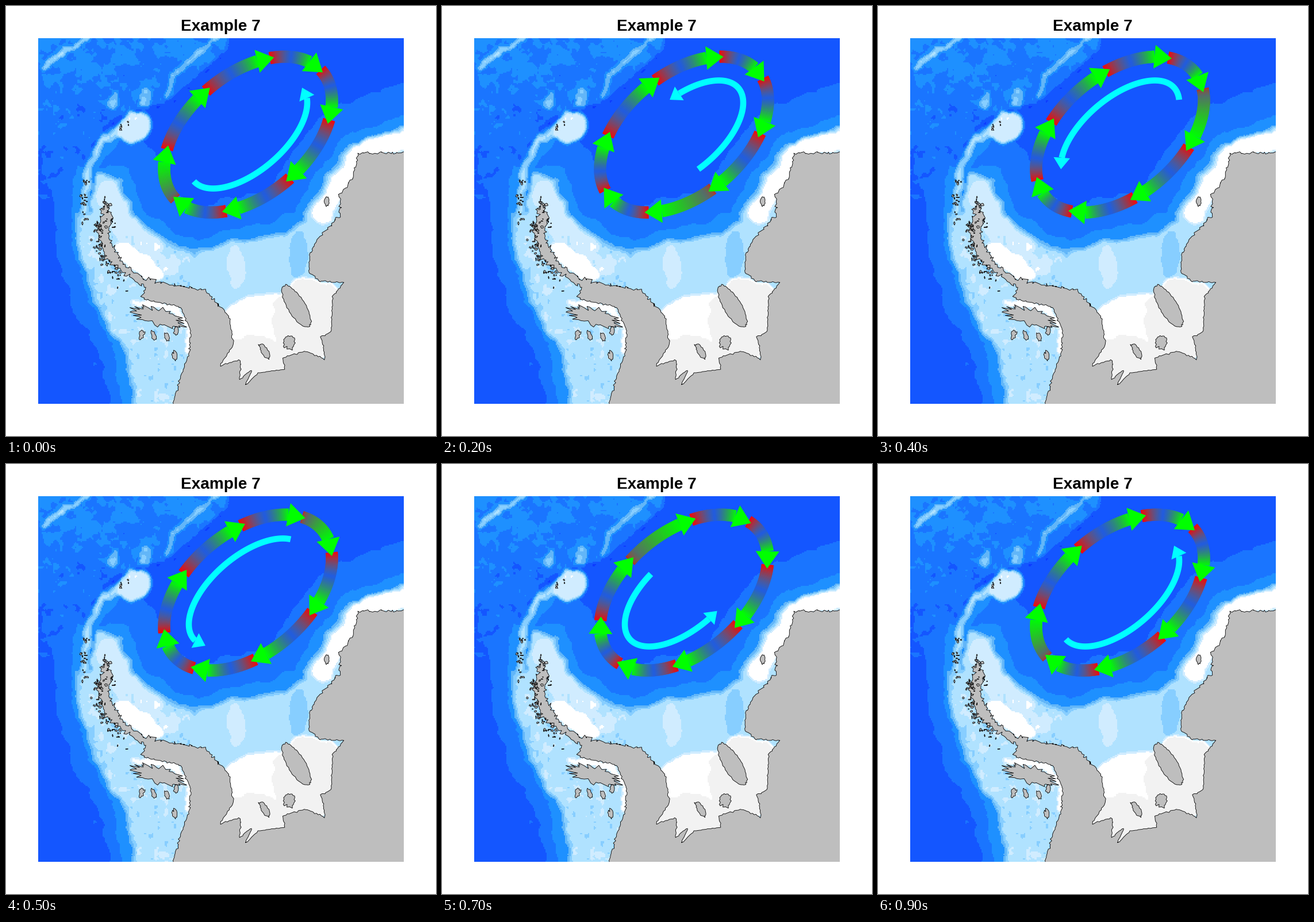
A matplotlib script for the animation above (1000 ms loop, 748 px wide and 748 px high).

```python
import numpy as np
import matplotlib.pyplot as plt
from matplotlib.animation import FuncAnimation
from matplotlib.collections import PolyCollection
from matplotlib.patches import Rectangle
from matplotlib.path import Path

SIZE, LEFT, RIGHT, CELL = 748, 56, 692, 2
FRAMES, TURN = 10, 40          # degrees turned per frame
rng = np.random.default_rng(7)

fig = plt.figure(figsize=(SIZE / 100, SIZE / 100), dpi=100, facecolor="white")
ax = fig.add_axes([0, 0, 1, 1])
ax.axis("off")

# ---- sea floor: a depth field built from distances, then cut into levels ----
SHADES = ["#0d3cff", "#1456ff", "#1a75ff", "#1e90ff", "#62b6f8",
          "#87ceff", "#b0e2ff", "#d0ecff", "#ffffff", "#f2f2f2"]
axis = np.arange(LEFT, RIGHT, CELL) + CELL / 2
N = len(axis)


def noise(scale):
    """Smooth random field of about unit spread with blobs of `scale` pixels."""
    m = int((RIGHT - LEFT) / scale) + 2
    knots = np.linspace(LEFT, RIGHT, m)
    rows = np.array([np.interp(axis, knots, r) for r in rng.normal(size=(m, m))])
    return np.array([np.interp(axis, knots, c) for c in rows.T]).T


gx, gy = np.meshgrid(axis, axis)
wx = gx + 3 * noise(16) + 1.2 * noise(5)
wy = gy + 3 * noise(16) + 1.2 * noise(5)


def inside(points):
    grid = np.column_stack([wx.ravel(), wy.ravel()])
    return Path(points).contains_points(grid).reshape(N, N)


def distance(points):
    best = np.full((N, N), np.inf)
    for (x0, y0), (x1, y1) in zip(points, points[1:]):
        dx, dy = x1 - x0, y1 - y0
        u = np.clip(((wx - x0) * dx + (wy - y0) * dy) / (dx * dx + dy * dy), 0, 1)
        best = np.minimum(best, np.hypot(wx - x0 - u * dx, wy - y0 - u * dy))
    return best


def streak(level, width, *points):
    depth[distance(points) < width / 2] = level


def blob(level, x, y, rx, ry, tilt=0):
    c, s = np.cos(np.radians(tilt)), np.sin(np.radians(tilt))
    dx, dy = wx - x, wy - y
    depth[((c * dx + s * dy) / rx) ** 2 + ((c * dy - s * dx) / ry) ** 2 < 1] = level


depth = np.ones((N, N))
grain = np.full((N, N), .15)

# open ocean north-west of the ridge gets shallower towards the top
ocean = inside([(0, 0), (395, 0), (385, 75), (275, 170), (150, 240), (115, 330), (0, 345)])
depth[ocean] = (2.75 - (gy - LEFT) / 200)[ocean]
grain[ocean] = .35
blob(0, 600, 70, 185, 42)
blob(0, 655, 110, 90, 65)
blob(2.2, 200, 268, 45, 32)

# continental shelf: level follows the distance from its edge
edge = [(236, 720), (210, 605), (155, 505), (130, 420), (126, 340), (140, 290),
        (197, 304), (222, 370), (280, 413), (330, 434), (395, 411), (475, 402),
        (520, 374), (560, 300), (603, 247), (720, 205)]
shelf = inside(edge + [(720, 720)])
reach = distance(edge)
east = wx > 180
slope = np.interp(reach, [0, 5, 7, 22, 25, 75, 80], [5, 4, 3, 3, 2, 2, 1])
slope_west = np.interp(reach, [0, 5, 7, 12, 15, 42, 46], [5, 4, 3, 3, 2, 2, 1])
depth = np.where(shelf, 6, np.maximum(depth, np.where(east, slope, slope_west)))
grain[shelf & (gx < 320) & (gy > 400)] = .5

# ridge with its trough, banks and streaks
streak(3, 28, (235, 200), (185, 225), (150, 270), (132, 350))
streak(.4, 5, (385, 78), (300, 160), (195, 198), (150, 235))
streak(5.6, 11, (215, 205), (165, 238), (145, 275), (130, 400))
blob(7, 222, 212, 30, 24, -30)
blob(4.5, 243, 160, 11, 18)
blob(4.3, 186, 167, 8, 18)
streak(5.5, 8, (62, 106), (100, 78), (142, 57))
streak(4.5, 9, (280, 150), (290, 120), (365, 56))

# light banks and ice
blob(7, 400, 455, 16, 36)
blob(5, 508, 435, 15, 45)
streak(7, 42, (180, 325), (205, 385), (280, 450))
blob(8, 232, 446, 48, 18, 38)
streak(8, 12, (225, 517), (290, 522), (318, 550), (318, 600))
streak(8, 32, (720, 228), (625, 247), (580, 308), (548, 362))
blob(8, 462, 568, 97, 66)
blob(9, 530, 545, 66, 72)
blob(9, 430, 622, 70, 48)

for _ in range(2):
    p = np.pad(depth, 1, mode="edge")
    depth = sum(p[i:i + N, j:j + N] for i in range(3) for j in range(3)) / 9
grain[depth > 7.5] = 0
level = np.rint(depth + grain * (noise(14) + .6 * noise(5)))
palette = np.array([[int(s[i:i + 2], 16) for i in (1, 3, 5)] for s in SHADES], np.uint8)
ax.imshow(palette[np.clip(level, 0, 9).astype(int)], extent=(LEFT, RIGHT, RIGHT, LEFT),
          interpolation="nearest", zorder=0)

# ---- land ----
map_box = Rectangle((LEFT, LEFT), RIGHT - LEFT, RIGHT - LEFT, transform=ax.transData)


def coast(amount, *points):
    """Key points joined by a ragged line."""
    pts = np.array(points, float)
    s = np.r_[0, np.cumsum(np.hypot(*np.diff(pts, axis=0).T))]
    u = np.linspace(0, s[-1], int(s[-1] / 3) + 2)
    line = np.column_stack([np.interp(u, s, c) for c in pts.T])
    line[1:-1] += rng.normal(0, amount, (len(u) - 2, 2))
    return line


def land(points):
    patch = plt.Polygon(points, fc="#bebebe", ec="black", lw=.6, zorder=2)
    ax.add_patch(patch)
    patch.set_clip_path(map_box)


def island(x, y, rx, ry, tilt=0, amount=.1):
    a = np.linspace(0, 2 * np.pi, int(rx + ry) + 7)[:-1]
    r = 1 + rng.normal(0, amount, len(a))
    c, s = np.cos(np.radians(tilt)), np.sin(np.radians(tilt))
    px, py = rx * r * np.cos(a), ry * r * np.sin(a)
    land(np.column_stack([x + c * px - s * py, y + s * px + c * py]))


land(np.vstack([
    # eastern coast, inner bay, both sides of the peninsula, southern coast
    coast(1.4, (720, 255), (612, 256), (604, 296), (580, 328), (581, 365), (545, 402)),
    coast(.7, (545, 402), (528, 432), (527, 462), (545, 479), (588, 481), (568, 505),
          (566, 566), (548, 575), (556, 615), (520, 600), (482, 612), (485, 632),
          (440, 638), (416, 661), (428, 633), (406, 650), (408, 615), (372, 626),
          (396, 590), (388, 540), (376, 525)),
    coast(2, (376, 525), (350, 496), (240, 475), (204, 450), (177, 400), (184, 365),
          (172, 335)),
    coast(2, (172, 335), (160, 390), (172, 440), (243, 492), (240, 510)),
    coast(1, (240, 510), (303, 524), (320, 560), (320, 600), (305, 640), (290, 692),
          (290, 720), (720, 720)),
]))
island(505, 522, 15, 42, -32, .03)
island(493, 586, 10, 12, 0, .15)
island(450, 601, 6, 15, -30, .1)
island(264, 540, 44, 13, 15, .16)
island(558, 340, 4, 8)
for x, y in [(236, 572), (257, 573), (280, 576), (296, 565), (293, 608)]:
    island(x, y, 4, 8, rng.uniform(-20, 20), .2)

# islets strewn along the western side
for count, spread, x0, y0, x1, y1 in [(22, 2.5, 141, 297, 132, 385),
                                      (45, 5, 160, 372, 166, 440),
                                      (26, 5, 168, 440, 210, 494),
                                      (20, 5, 172, 335, 184, 385),
                                      (6, 2, 196, 213, 212, 205)]:
    for u in rng.random(count):
        island(x0 + u * (x1 - x0) + rng.normal(0, spread),
               y0 + u * (y1 - y0) + rng.normal(0, spread),
               *rng.uniform(.4, 2.4, 2), amount=.3)

ax.text(373.5, 43, "Example 7", ha="center", va="baseline", fontsize=20.16,
        family="Liberation Sans", weight="bold", color="black")

# ---- currents: sheared circles (centre, half width, half height, lag) ----
OUTER = (421, 223.7, 146, 135.5, 64)
INNER = (421, 223.5, 103, 94, 54)
SLICES = 40


def orbit(deg, ring):
    cx, cy, w, h, lag = ring
    return np.column_stack([cx + w * np.cos(np.radians(deg)),
                            cy - h * np.cos(np.radians(deg - lag))])


def sides(deg, ring, half):
    """Both edges of a band along the ring."""
    tangent = orbit(deg + .5, ring) - orbit(deg - .5, ring)
    tangent /= np.hypot(*tangent.T)[:, None]
    normal = tangent[:, ::-1] * (1, -1)
    mid = orbit(deg, ring)
    return mid + half * normal, mid - half * normal


def head(tip, back, ring, length, width):
    """Arrowhead triangle and the angle at which its base meets the ring."""
    degs = tip + back * np.linspace(0, 40, 400)
    pts = orbit(degs, ring)
    i = np.argmin(np.abs(np.hypot(*(pts - pts[0]).T) - length))
    along = (pts[0] - pts[i]) / length
    across = along[::-1] * (1, -1) * width / 2
    return [pts[0], pts[i] + across, pts[i] - across], degs[i]


def fade(ease, floor):
    """Red to green, most see-through over the blue sea half way along."""
    u = (((np.arange(SLICES) + .5) / SLICES) ** ease)[:, None]
    alpha = floor + (1 - floor) * np.abs(2 * u - 1)
    hue = np.hstack([1 - u, u, 0 * u])
    return alpha * hue + (1 - alpha) * np.array([20, 87, 255]) / 255


band_colors = np.vstack([fade(.4, .6)] + [fade(1, .12)] * 7)
bands = PolyCollection([], facecolors=band_colors, edgecolors=band_colors, lw=.3, zorder=4)
heads = PolyCollection([], facecolors="#00ff00", edgecolors="none", zorder=5)
inner = PolyCollection([], facecolors="#00ffff", edgecolors="none", zorder=6)
for c in (bands, heads, inner):
    ax.add_collection(c)


def update(frame):
    turn = TURN * frame
    quads, tips = [], []
    for i in range(8):
        tip = 162 + turn - 45 * i
        triangle, base = head(tip, 1, OUTER, 30, 41)
        a, b = sides(np.linspace(tip + 48, base, SLICES + 1), OUTER, 10.5)
        quads += [[a[j], a[j + 1], b[j + 1], b[j]] for j in range(SLICES)]
        tips.append(triangle)
    bands.set_verts(quads)
    heads.set_verts(tips)

    tail = 204 + turn
    triangle, base = head(tail + 180, -1, INNER, 20, 28.5)
    a, b = sides(np.linspace(tail, base, 80), INNER, 5.3)
    inner.set_verts([np.vstack([a, b[::-1]]), triangle])
    return bands, heads, inner


ax.set_xlim(0, SIZE)
ax.set_ylim(SIZE, 0)
ax.set_aspect("auto")
anim = FuncAnimation(fig, update, frames=FRAMES, interval=100, repeat=True, blit=False)
plt.show()
```
